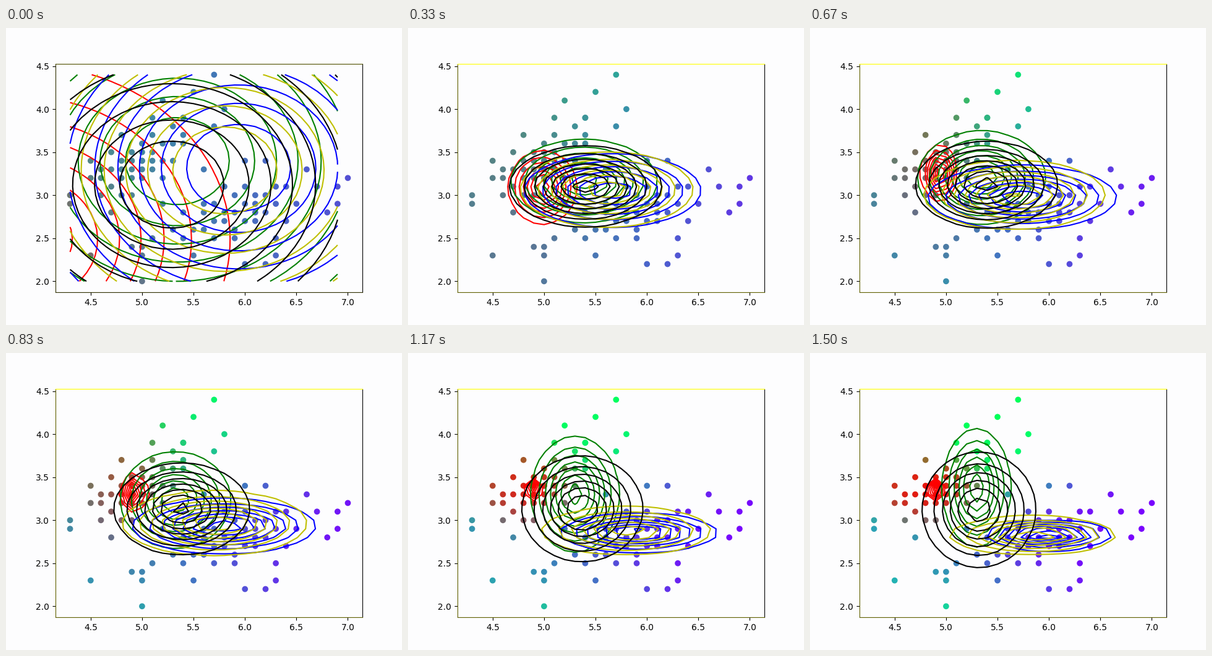
Animation of 640 by 480 pixels, one loop 1670 ms. Source, as a matplotlib script:

```python
import matplotlib.pyplot as plt
import numpy as np
from matplotlib.animation import FuncAnimation

STEPS, LOOP, TICK = 10, 1670, 10
PAPER = "#fdfdfe"
LINES = "rgbyk"
TINTS = np.array([(1, 0, 0), (0, 1, 0.22), (0.5, 0, 1), (0.45, 0, 1), (0, 1, 0.7)])
START = np.array([(3.817, 2.485), (5.343, 3.396), (5.938, 3.317),
                  (5.805, 3.288), (5.289, 3.123)])

# lone samples around the two clouds
UPPER = [(4.3, 3.0), (4.5, 2.3), (5.2, 4.1), (5.4, 3.9), (5.4, 3.9),
         (5.5, 4.2), (5.7, 3.8), (5.7, 4.4), (5.8, 4.0)]
LOWER = [(4.9, 2.4), (5.0, 2.0), (5.0, 2.3), (5.1, 2.5), (6.0, 2.2), (6.2, 2.2),
         (6.3, 2.3), (6.3, 2.5), (6.0, 3.4), (6.8, 2.8), (6.9, 3.1), (7.0, 3.2)]


def normal(u):
    """Unit-variance normal scores of evenly spread fractions u."""
    z = np.linspace(-3.5, 3.5, 701)
    cdf = np.cumsum(np.exp(-z * z / 2))
    q = np.interp(u, cdf / cdf[-1], z)
    return (q - q.mean()) / q.std()


def cloud(n, x, y, spread, slope, noise):
    """Slanted cloud of n samples, measured to one decimal."""
    i = np.arange(n) + 0.5
    dx = spread * normal(i / n)
    dy = slope * dx + noise * normal(i * 0.618034 % 1)
    return np.round(np.column_stack([x + dx, y + dy]), 1)


pts = np.vstack([cloud(41, 4.946, 3.361, 0.271, 0.518, 0.203), UPPER,
                 cloud(38, 5.929, 2.832, 0.410, 0.319, 0.190), LOWER])
gx, gy = np.meshgrid(np.linspace(4.3, 6.9, 27), np.linspace(2.0, 4.4, 25))


def bell(x, y, mean, sd):
    """Axis-aligned normal density."""
    u, v = (x - mean[0]) / sd[0], (y - mean[1]) / sd[1]
    return np.exp(-(u * u + v * v) / 2) / (2 * np.pi * sd[0] * sd[1])


def shares(weight, mean, var):
    """Share of every component in every sample."""
    p = np.array([w * bell(pts[:, 0], pts[:, 1], m, np.sqrt(v))
                  for w, m, v in zip(weight, mean, var)]).T
    return p / p.sum(axis=1, keepdims=True)


def fit(steps):
    """Expectation-maximisation of a diagonal Gaussian mixture."""
    weight, mean, var = np.full(5, 0.2), START, np.ones((5, 2))
    for _ in range(steps):
        r = shares(weight, mean, var)
        yield mean, var, r
        total = r.sum(axis=0)
        weight = total / len(pts)
        mean = r.T @ pts / total[:, None]
        gap = pts[:, None, :] - mean
        var = (r[:, :, None] * gap ** 2).sum(axis=0) / total[:, None]


fig, ax = plt.subplots(figsize=(6.4, 4.8), dpi=100, facecolor=PAPER)
ax.set_facecolor(PAPER)
ax.set_xlim(4.1585, 7.1415)
ax.set_ylim(1.8715, 4.5285)


def plot(mean, var, r):
    """Samples and contours of one fitting step, hidden at first."""
    parts = [ax.scatter(pts[:, 0], pts[:, 1], c=np.clip(r @ TINTS, 0, 1))]
    # the variances serve as the widths of the drawn bells
    for m, v, color in zip(mean, var, LINES):
        parts.append(ax.contour(gx, gy, bell(gx, gy, m, v) + 1e-9, colors=color))
    for part in parts:
        part.set_visible(False)
    return parts


stages = [plot(*state) for state in fit(STEPS)]


def draw(n):
    step = int((n * TICK + TICK / 2) * 0.006)  # six steps a second
    for k, parts in enumerate(stages):
        for part in parts:
            part.set_visible(k == step)
    ax.spines["top"].set_color("#ffff00" if step else "#505000")
    ax.spines[["left", "bottom"]].set_color("#606000" if step else "#303000")
    return stages[step]


anim = FuncAnimation(fig, draw, frames=LOOP // TICK, init_func=lambda: draw(0),
                     interval=TICK, repeat=True, repeat_delay=0)
plt.show()
```
